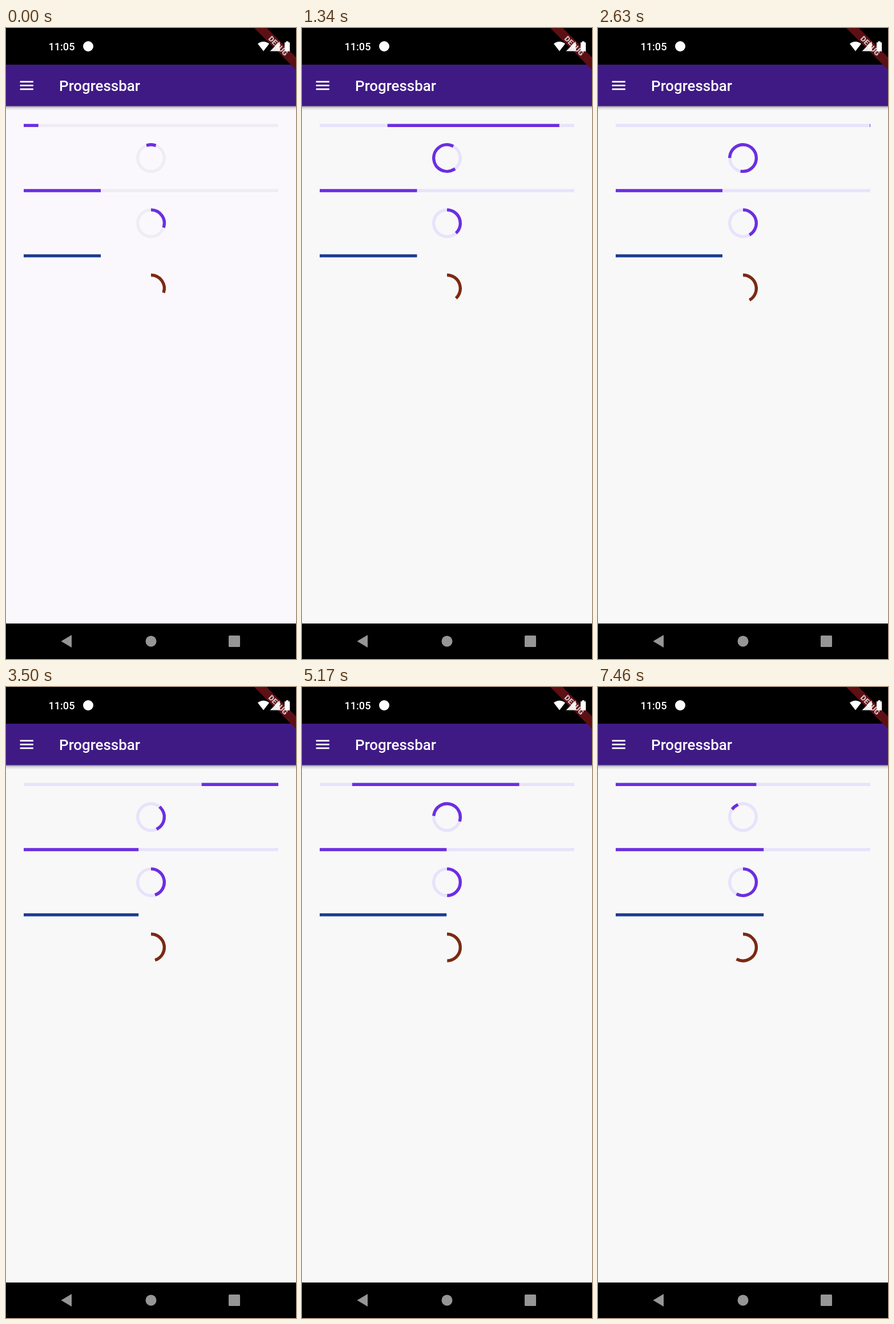
Recreate the animation shown at these times as an HTML page. Size 508 px wide and 1102 px high, loop 7.58 s.

```html
<!DOCTYPE html>
<html lang="en">
<head>
<meta charset="utf-8">
<title>Progressbar</title>
<style>
  html, body { margin: 0; width: 100%; height: 100%; overflow: hidden; background: #000; }
  svg { display: block; width: 100%; height: 100%; --page: #f8f8f9; --track: #e8e3fb; }
  svg.soft { --page: #fbf8fd; --track: #efecf5; }
  text { font-family: Roboto, sans-serif; font-weight: 500; fill: #fff; }
  #tracks, #accent, #blue, #brown { fill: none; stroke-width: 5.4; }
  #tracks { stroke: var(--track); }
  #accent { stroke: #6c2ee0; }
  #blue { stroke: #1b3a8f; }
  #brown { stroke: #7b2a12; }
  #spin { stroke-linecap: square; }
</style>
</head>
<body>
<svg id="stage" viewBox="0 0 508 1102">
  <defs>
    <linearGradient id="shade" x2="0" y2="1">
      <stop stop-opacity=".42"/>
      <stop offset=".45" stop-opacity=".12"/>
      <stop offset="1" stop-opacity="0"/>
    </linearGradient>
  </defs>
  <rect width="508" height="1102"/>
  <rect y="64" width="508" height="976" fill="var(--page)"/>
  <rect y="136" width="508" height="8" fill="url(#shade)"/>
  <rect y="64" width="508" height="72.4" fill="#3f1a85"/>
  <path d="M24.6 93.9H47.9M24.6 100.4H47.9M24.6 106.9H47.9" stroke="#fff" stroke-width="2.6"/>
  <text x="93.1" y="109.6" font-size="25.9">Progressbar</text>

  <g transform="translate(508) rotate(45)">
    <rect x="-52" y="36.2" width="104" height="15.5" fill="#5d1014"/>
    <text y="48.7" font-size="13.2" text-anchor="middle" style="font-weight:900;fill:#d3c3c6">DEBUG</text>
  </g>

  <text x="74.5" y="39" font-size="18.1">11:05</text>
  <g fill="#fff">
    <circle cx="144" cy="32" r="9"/>
    <path d="M451 40.5L441 27.5Q451 20 461 27.5Z"/>
    <path d="M462.5 40.5L479.5 23.5V40.5Z" fill-opacity=".92"/>
    <path d="M488 25.2H490.5V23.3H494.7V25.2H497.2V40.8H488Z"/>
  </g>

  <path id="tracks"/>
  <g id="accent">
    <path id="slide"/>
    <path id="spin"/>
    <path id="fill"/>
  </g>
  <path id="blue"/>
  <path id="brown"/>

  <g fill="#969696">
    <path d="M96.5 1071L115 1060V1082Z"/>
    <circle cx="254" cy="1071" r="9.5"/>
    <rect x="390" y="1061" width="20" height="20" rx="1.5"/>
  </g>
</svg>
<script>
const LOOP = 7580, FPS = 24, LEFT = 31, WIDTH = 446, CX = 254, R = 23.3;
const barY = row => 170.2 + 113.85 * row;
const ringY = row => barY(row) + 56.9;
const el = id => document.getElementById(id);
const clamp = x => Math.min(1, Math.max(0, x));

// Screen refresh number to app clock in ms: the screen stalls once, then catches up
const clock = [[0, 9083], [11, 9516], [17, 9516], [32, 11466],
  [63, 12577], [84, 13533], [124, 14950], [179, 17434]];
function appTime(frame) {
  const i = Math.max(1, clock.findIndex(key => key[0] >= frame));
  const [[f0, a0], [f1, a1]] = clock.slice(i - 1, i + 1);
  return a0 + (a1 - a0) * (frame - f0) / (f1 - f0);
}

// Easing curve with handles (x1, 0) and (x2, 1)
function ease(x, x1, x2) {
  x = clamp(x);
  if (x === 0 || x === 1) return x;
  let lo = 0, hi = 1, s;
  for (let i = 0; i < 24; i++) {
    s = (lo + hi) / 2;
    const bx = 3 * s * (1 - s) * ((1 - s) * x1 + s * x2) + s ** 3;
    if (bx < x) lo = s; else hi = s;
  }
  return s * s * (3 - 2 * s);
}

const bar = (row, from, to) =>
  to > from ? `M${LEFT + WIDTH * from} ${barY(row)}H${LEFT + WIDTH * to}` : "";

// Clockwise arc, in turns from the top
function ring(row, from, sweep) {
  const at = turn => {
    const angle = turn * 2 * Math.PI;
    return `${CX + R * Math.sin(angle)} ${ringY(row) - R * Math.cos(angle)}`;
  };
  return `M${at(from)}A${R} ${R} 0 ${+(sweep > .5)} 1 ${at(from + sweep)}`;
}

function slidePath(a) {
  const p = a % 1800;
  const part = (start, length, x1, x2) => ease((p - start) / length, x1, x2);
  return bar(0, part(333, 750, .4, 1), part(0, 750, .2, .8))
    + bar(0, part(1267, 533, .1, .45), part(1000, 567, 0, .65));
}

function spinPath(a) {
  const p = a % 1333 / 1333;
  const head = ease(p * 2, .4, .2), tail = ease(p * 2 - 1, .4, .2);
  return ring(0, tail * .75 + a % 2222 / 2222 + p / 4, Math.max((head - tail) * .75, .0002));
}

const set = (id, d) => el(id).setAttribute("d", d);

function draw(now) {
  const t = now % LOOP;
  const a = appTime(Math.min(179, Math.floor(t * FPS / 1000)));
  const value = a / 30000;
  el("stage").classList.toggle("soft", t < 130);
  set("slide", slidePath(a));
  set("spin", spinPath(a));
  set("fill", bar(1, 0, value) + ring(1, 0, value));
  set("blue", bar(2, 0, value));
  set("brown", ring(2, 0, value));
}

set("tracks", [0, 1].map(row => bar(row, 0, 1) + ring(row, 0, .5) + ring(row, .5, .5)).join(""));

const start = performance.now();
function tick() {
  draw(performance.now() - start);
  requestAnimationFrame(tick);
}
tick();
</script>
</body>
</html>
```
